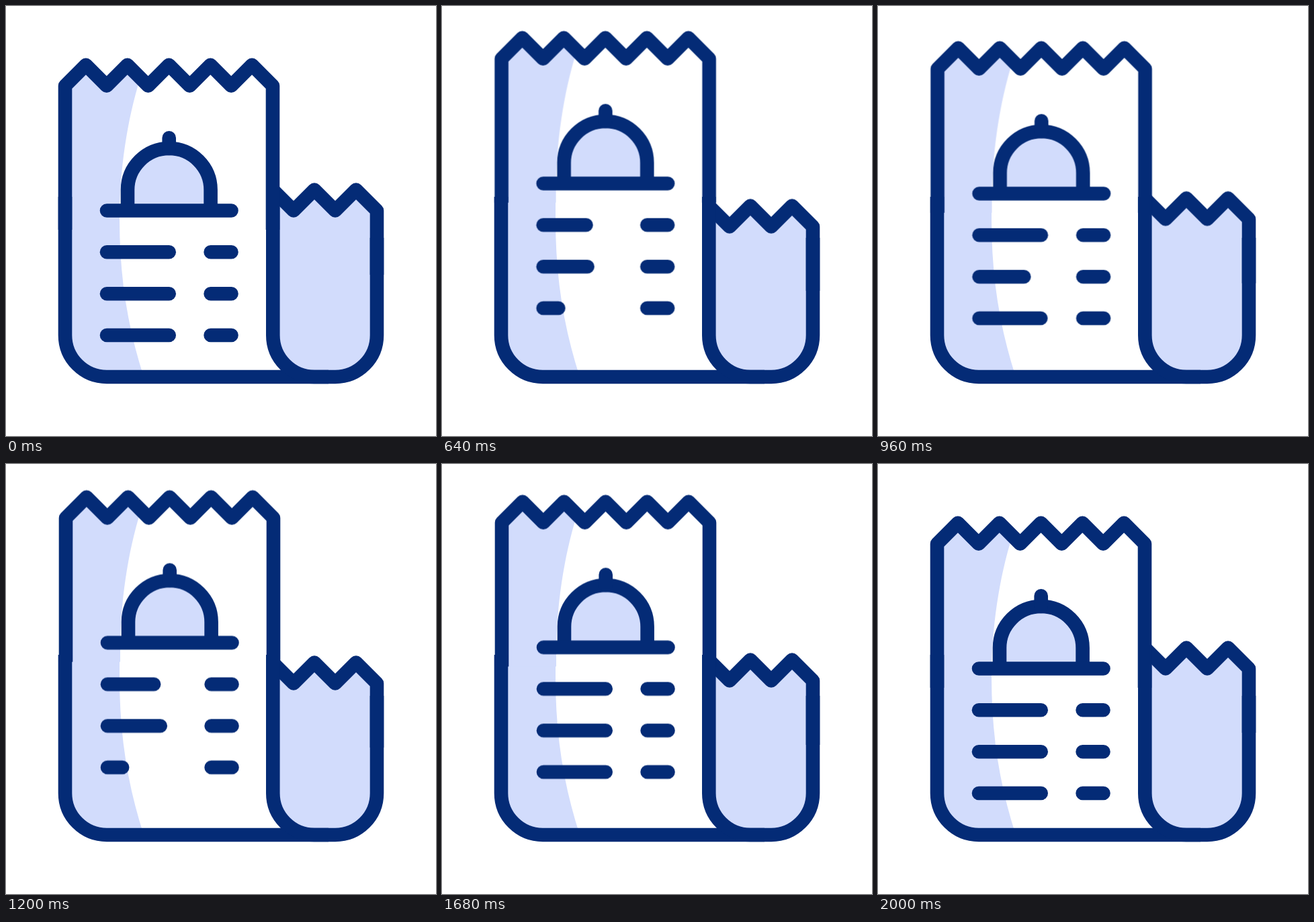
Animation, 640 px wide and 640 px high, one loop 2160 ms. Source, as an HTML page without scripts:

```html
<!DOCTYPE html>
<html lang="en">
<head>
<meta charset="utf-8">
<title>Restaurant receipt</title>
<style>
html, body { margin: 0; width: 100%; height: 100%; overflow: hidden; background: #fff; }
svg { display: block; width: 100vw; height: 100vh; }
.ink { fill: none; stroke: #042b76; stroke-width: 20.6; stroke-linejoin: round; }
.round { stroke-linecap: round; }
.tint { fill: #d2dcfc; }
.sheet { animation: lift 2160ms infinite; }
.flap { animation: dip 2160ms infinite; }
.item {
  stroke-dasharray: 92.7 300;
  animation: trim 2160ms cubic-bezier(.37, 0, .63, 1) var(--wait) infinite;
}

/* both ends of the paper bounce on the same beats */
@keyframes lift {
  0%, 9.26% { transform: none; animation-timing-function: cubic-bezier(.4, 0, .7, .75); }
  16.667% { transform: translate(.6px, -34px); animation-timing-function: cubic-bezier(.35, .5, .65, 1); }
  21.76% { transform: translate(.6px, -48px); animation-timing-function: cubic-bezier(.37, 0, .63, 1); }
  42.13% { transform: translate(.5px, -24.5px); animation-timing-function: cubic-bezier(.37, 0, .63, 1); }
  57.87% { transform: translate(1px, -39.2px); animation-timing-function: cubic-bezier(.37, 0, .63, 1); }
  76.39% { transform: translate(1px, -32.2px); animation-timing-function: cubic-bezier(.4, 0, .2, 1); }
  92.59%, 100% { transform: none; }
}
@keyframes dip {
  0%, 9.26% { transform: none; animation-timing-function: cubic-bezier(.4, 0, .7, .75); }
  16.667% { transform: translateY(21.4px); animation-timing-function: cubic-bezier(.35, .5, .65, 1); }
  21.76% { transform: translateY(29.6px); animation-timing-function: cubic-bezier(.37, 0, .63, 1); }
  42.13% { transform: translateY(12px); animation-timing-function: cubic-bezier(.37, 0, .63, 1); }
  57.87% { transform: translateY(22.5px); animation-timing-function: cubic-bezier(.37, 0, .63, 1); }
  76.39% { transform: translateY(18.3px); animation-timing-function: cubic-bezier(.4, 0, .2, 1); }
  92.59%, 100% { transform: none; }
}
@keyframes trim {
  0%, 25.46%, 27.55%, 53.01%, 100% { stroke-dashoffset: 0; }
  12.73%, 40.28% { stroke-dashoffset: var(--cut); }
}
</style>
</head>
<body>
<svg viewBox="0 0 640 640">
  <!-- fixed lower part -->
  <path class="tint" d="M88 284H169V318C169 400 180 475 205 552H150A62 62 0 0 1 88 490Z"/>
  <path class="tint" d="M397 345H552V490A62 62 0 0 1 490 552H459A62 62 0 0 1 397 490Z"/>

  <g class="flap">
    <path class="tint" d="M397 273.5l31 31 31-31 31 31 31-31 31 31V400H397Z"/>
    <path class="ink" d="M397 273.5l31 31 31-31 31 31 31-31 31 31V400"/>
  </g>

  <g class="sheet">
    <path class="tint" d="M88 118.7l31-31 31 31 31-31 19 19C180 170 169 245 169 318V333H88Z"/>
    <path class="ink" d="M88 333V118.7l30.9-31 30.9 31 30.9-31 30.9 31 30.9-31 30.9 31 30.9-31 30.9 31 30.9-31 30.9 31V333"/>
    <path class="ink tint" style="fill:#d2dcfc" d="M181 304.5V273.8a61.8 61.8 0 0 1 123.6 0V304.5"/>
    <path class="ink round" d="M242.7 196.3V212M150 304.5H335.5"/>
    <path class="ink round" d="M304.6 366.3h30.9M304.6 428.2h30.9M304.6 490h30.9"/>
    <path class="ink round item" style="--wait:430ms;--cut:33px" d="M150 366.3h92.7"/>
    <path class="ink round item" style="--wait:525ms;--cut:71px" d="M150 428.2h92.7"/>
    <path class="ink round item" style="--wait:345ms;--cut:71px" d="M150 490h92.7"/>
  </g>

  <path class="ink" d="M88 284V490A62 62 0 0 0 150 552H490A62 62 0 0 0 552 490V345"/>
  <path class="ink" d="M397.3 284V490A62 62 0 0 0 459 552H480"/>
</svg>
</body>
</html>
```
